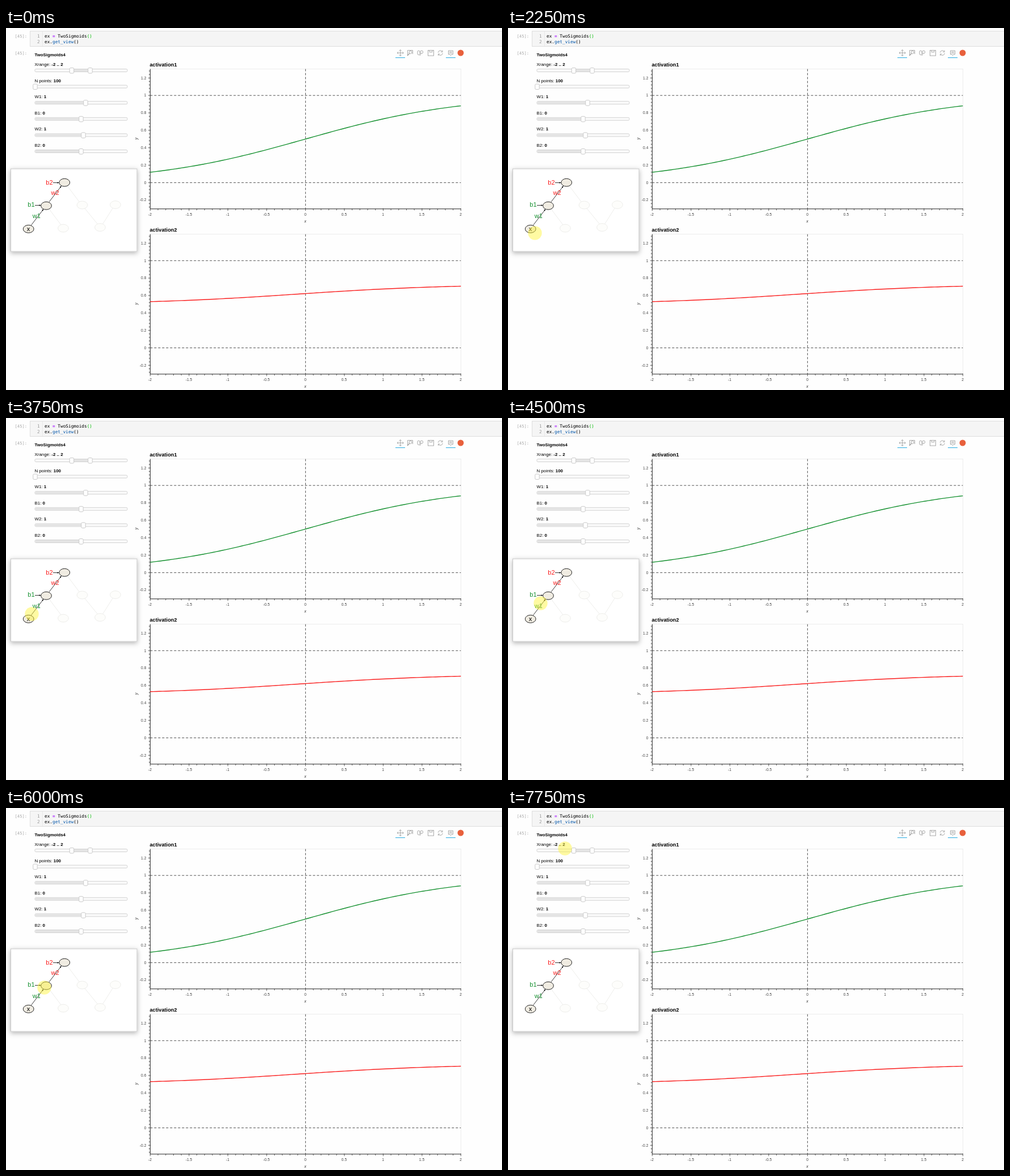
Write an HTML page that moves like this. It is 875x640 px and loops after 8 s.

```html
<!DOCTYPE html>
<html lang="en">
<head>
<meta charset="utf-8">
<title>Two sigmoids</title>
<style>
html, body { margin: 0; width: 100%; height: 100%; overflow: hidden; background: #fefefe; }
svg { display: block; width: 875px; height: 640px; font-family: "Liberation Sans", Arial, sans-serif; }
.mono { font-family: "DejaVu Sans Mono", monospace; font-size: 7.75px; white-space: pre; }
.b { font-weight: bold; }
.crisp { shape-rendering: crispEdges; }
.icon { fill: none; stroke: #a0a0a0; stroke-width: .9; }
</style>
</head>
<body>
<svg id="stage" viewBox="0 0 875 640" xmlns="http://www.w3.org/2000/svg">
  <defs>
    <filter id="shade" x="-10%" y="-10%" width="120%" height="125%">
      <feDropShadow dx="0" dy="2.5" stdDeviation="4.5" flood-color="#000" flood-opacity=".3"/>
    </filter>
    <marker id="tip" markerWidth="4" markerHeight="4" refX="3.4" refY="2" orient="auto" markerUnits="userSpaceOnUse">
      <path d="M.4 .7 3.6 2 .4 3.3z"/>
    </marker>
  </defs>
  <rect width="875" height="640" fill="#fefefe"/>
  <g class="crisp">
    <rect x="42.5" y="5.5" width="840" height="27" fill="#f5f5f5" stroke="#dedede"/>
    <path d="M64.5 6V32" stroke="#e8e8e8"/>
  </g>
  <g class="mono">
    <g fill="#a8a8a8" style="font-size:7.2px"><text x="15.5" y="17">[45]:</text><text x="15.5" y="47">[45]:</text></g>
    <g fill="#999"><text x="55" y="16.7">1</text><text x="55" y="26.7">2</text></g>
    <text x="68" y="16.7">ex <tspan fill="#a2f" class="b">=</tspan> TwoSigmoids<tspan fill="#0b0">()</tspan></text>
    <text x="68" y="26.7">ex.<tspan fill="#05a">get_view</tspan>()</text>
  </g>
  <text class="b" x="50.5" y="50" font-size="7.8">TwoSigmoids4</text>
  <g id="sliders" font-size="7.9"></g>
  <g id="net"></g>
  <g id="tools"></g>
  <g id="plots"></g>
  <circle id="spot" r="12.2" fill="#fff53c" fill-opacity=".48"/>
</svg>
<script>
const $ = id => document.getElementById(id);

// sliders: label, value, fill start, fill end, handles
const sliders = [
  ["Xrange", "-2 .. 2", 116, 148, [116, 148.5]],
  ["N points", "100", 51, 51, [51.5]],
  ["W1", "1", 51, 140, [140.5]],
  ["B1", "0", 51, 132, [132.5]],
  ["W2", "1", 51, 136, [136.5]],
  ["B2", "0", 51, 132, [132.5]]
];
$("sliders").innerHTML = sliders.map(([name, value, from, to, knobs], i) => {
  const y = 75 + i * 28.6;
  return `<text x="50.5" y="${y - 8}">${name}: <tspan class="b">${value}</tspan></text>
    <rect x="51" y="${y - 2.5}" width="163" height="5" rx="1.8" fill="#fafafa" stroke="#d2d2d2"/>
    <rect x="${from}" y="${y - 2}" width="${to - from}" height="4" fill="#e4e4e4"/>` +
    knobs.map(x => `<rect x="${x - 3.7}" y="${y - 4.5}" width="7.4" height="9.5" rx="1.8" fill="#fff" stroke="#c8c8c8"/>`).join("");
}).join("");

// network diagram
const node = (x, y) => `<ellipse cx="${x}" cy="${y}" rx="9.4" ry="6.9"/>`;
const label = (x, y, s, fill) => `<text x="${x}" y="${y}" fill="${fill}">${s}</text>`;
const green = "#14902f", red = "#fa1e1e";
$("net").innerHTML = `
  <rect x="8.5" y="249" width="222.5" height="146" fill="#fff" stroke="#c8c8c8" filter="url(#shade)"/>
  <g fill="#fdfdfb" stroke="#ebebe8" stroke-width=".9">
    <path d="M76 320 97 348M108 279 129 307M139 319 161 346M171 346 188 319"/>
    ${node(134.5, 313) + node(193, 312.5) + node(101, 354) + node(166, 352.5)}
  </g>
  <g stroke="#222" stroke-width=".9">
    ${["M44.5 348.5 66 320.5", "M76 307.5 97.5 279.5", "M51 313.5H61.5", "M83 273.5H93.5"]
      .map(d => `<path d="${d}" marker-end="url(#tip)"/>`).join("")}
  </g>
  <g fill="#f0ece2" stroke="#222">${node(39.7, 355.3) + node(71, 314.2) + node(103.2, 273.2)}</g>
  <g font-size="11">
    ${label(36.8, 359, "x", "#000")}${label(38.3, 316, "b1", green)}${label(46.7, 336, "w1", green)}
    ${label(70.3, 277, "b2", red)}${label(79.5, 295, "w2", red)}
  </g>`;

// plot toolbar
$("tools").innerHTML = `
  <g class="icon">
    <path d="M690.5 44H701M695.7 38.5V49.5M692 42l-2 2 2 2M699.4 42l2 2-2 2M693.7 40.5l2-2 2 2M693.7 47.5l2 2 2-2"/>
    <path d="M708.5 48V39.5H717.5V46"/>
    <circle cx="713.5" cy="43" r="2.5"/><path d="M711.7 45 708 49" stroke-width="1.4"/>
    <rect x="726" y="40" width="4" height="7.5" rx="2"/>
    <circle cx="733.2" cy="42.5" r="2.5"/><path d="M732 45 730 49"/>
    <rect x="744.5" y="39.5" width="10" height="9.5"/><path d="M747 39.5V42.5H752V39.5"/>
    <path d="M762.3 43.5A4 4 0 0 1 769.5 41.5M770.2 44.5A4 4 0 0 1 763 46.7M770 39.5V42.3H767.2M762.5 48.7V46H765.3"/>
    <path d="M780.5 40H788.5V46.5H786L784.5 48.5 783 46.5H780.5ZM782 42.2H787M782 44.3H787"/>
  </g>
  <path class="crisp" d="M687 52.5H704M776 52.5H793" stroke="#26aae1"/>
  <circle cx="802" cy="44" r="5.5" fill="#e8603c"/>`;

// plots
const X = v => 528.4 + v * 137;
const sig = v => 1 / (1 + Math.exp(-v));
const num = v => String(+v.toFixed(1));

function plot(dy, title, color, f) {
  const Y = v => 273.4 + dy - v * 154.2;
  const top = 72.5 + dy, base = 319.8 + dy, left = X(-2);
  let ticks = "", labels = "", curve = "";
  for (let i = -20; i <= 20; i++) {
    const x = X(i / 10), major = i % 5 === 0;
    ticks += `M${x} ${base - (major ? 1 : 0)}v${major ? 4.5 : 2.5}`;
    if (major) labels += `<text x="${x - .4}" y="${base + 12}" text-anchor="middle">${num(i / 10)}</text>`;
  }
  for (let i = -7; i <= 32; i++) {
    const y = Y(i / 25), major = i % 5 === 0;
    ticks += `M${left + (major ? 1 : 0)} ${y}h${major ? -4.5 : -2.5}`;
    if (major) labels += `<text x="${left - 7}" y="${y + 2.2}" text-anchor="end">${num(i / 25)}</text>`;
  }
  for (let i = 0; i < 100; i++) {
    const v = -2 + i * 4 / 99;
    curve += `${i ? "L" : "M"}${X(v).toFixed(2)} ${Y(f(v)).toFixed(2)}`;
  }
  return `<text class="b" x="253.5" y="${67.5 + dy}" font-size="9.2">${title}</text>
    <g fill="none">
      <path class="crisp" d="M${left} ${top}H${X(2)}V${base}" stroke="#ececec"/>
      <path d="M${left} ${top}V${base}H${X(2)}" stroke="#222"/>
      <path d="${ticks}" stroke="#333" stroke-width=".8"/>
      <path d="M${left} ${Y(1)}H${X(2)}M${left} ${Y(0)}H${X(2)}M${X(0)} ${top}V${base}" stroke="#505050" stroke-dasharray="4 3"/>
    </g>
    <path d="${curve}" fill="none" stroke="${color}" stroke-width="1.4"/>
    <g font-size="6.7" fill="#444">${labels}</g>
    <g font-size="7" font-style="italic" fill="#333" text-anchor="middle">
      <text x="528" y="${base + 23.7}">x</text>
      <text transform="translate(232 ${195.5 + dy}) rotate(-90)">y</text>
    </g>`;
}
$("plots").innerHTML =
  plot(0, "activation1", green, sig) +
  plot(292.1, "activation2", red, v => sig(sig(v)));

// pointer stops: quarter second, x, y; each holds until the next
const stops = [
  [3, 538, 328], [4, 343, 236], [5, 267, 283], [6, 103, 342], [7, 49, 354],
  [8, 41, 355], [9, 47, 362], [10, 20, 350], [11, 42, 364], [12, 43, 364],
  [15, 45, 346], [16, 44, 345], [17, 49, 337], [18, 57, 327], [21, 67, 319],
  [22, 62, 310], [23, 64, 318], [24, 67, 317], [28, 66, 300], [29, 92, 102],
  [30, 97, 66], [31, 100, 71]
];
const spot = $("spot");

function draw(ms) {
  const q = Math.floor(ms % 8000 / 250);
  const at = stops.filter(s => s[0] <= q).pop();
  spot.setAttribute("visibility", at ? "visible" : "hidden");
  if (at) spot.setAttribute("transform", `translate(${at[1] + .5} ${at[2] + .5})`);
}

let start;
function tick(now) {
  start ??= now;
  draw(now - start);
  requestAnimationFrame(tick);
}
draw(0);
requestAnimationFrame(tick);
</script>
</body>
</html>
```
